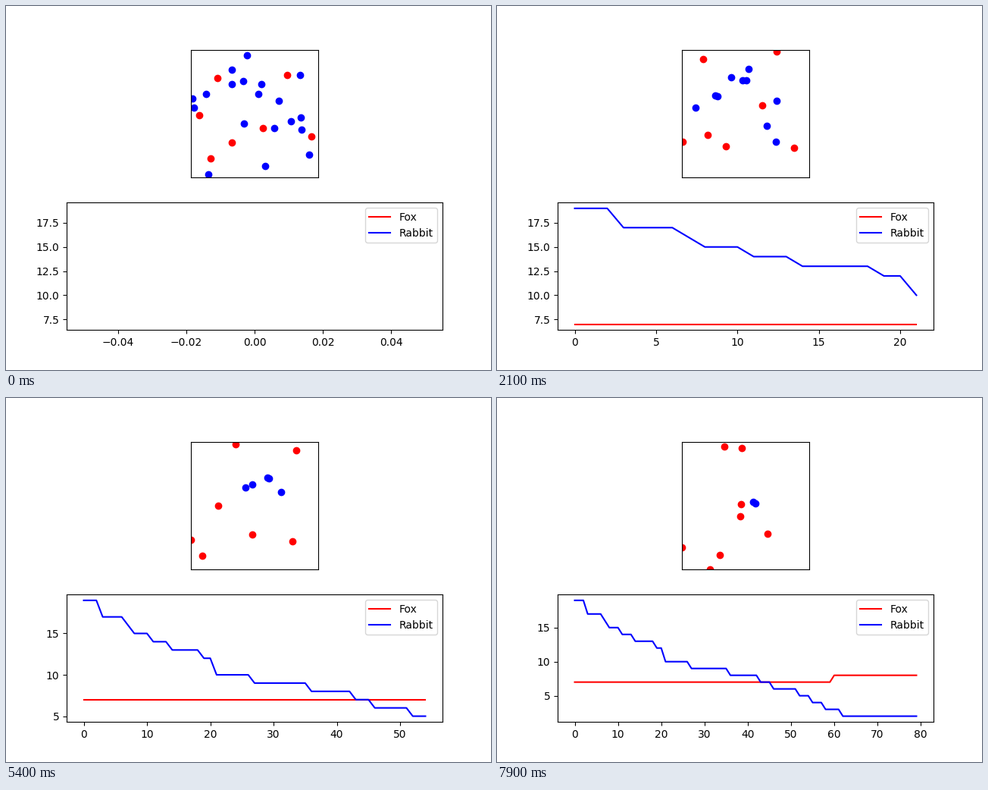
These frames come from a looping animation (640x480 px, 8 s). A matplotlib script:

```python
import numpy as np
import matplotlib.pyplot as plt
from matplotlib.animation import FuncAnimation

STEPS, INTERVAL = 80, 100
LEFT, TOP, SIDE = 244, 57.6, 168        # habitat square, stage pixels
FOX_STEP, RABBIT_STEP = 8, 5            # largest random move per step
HOME, PULL = (342, 130), 0.02           # rabbits slowly gather here

# Where the animals start
FOXES = [(279, 95), (371, 91), (255, 144), (339, 161), (403, 172), (298, 180),
         (270, 201)]
RABBITS = [(318, 65), (298, 84), (298, 103), (313, 99), (337, 103), (333, 116),
           (360, 125), (388, 91), (264, 116), (246, 122), (248, 134), (314, 155),
           (354, 161), (376, 152), (389, 147), (390, 163), (400, 196), (342, 211),
           (267, 222)]

# Steps at which a rabbit is eaten, and at which a fox is born
KILLS = [3, 3, 7, 8, 11, 14, 19, 21, 21, 27, 36, 43, 46, 52, 55, 58, 62]
BIRTH = 60

rng = np.random.default_rng(7)


def wander(animals, step):
    """Move every animal at random, keeping it inside the square."""
    moved = animals + rng.uniform(-step, step, animals.shape)
    return np.clip(moved, (LEFT, TOP), (LEFT + SIDE, TOP + SIDE))


def easiest_prey(foxes, rabbits):
    """Index of the rabbit closest to any fox."""
    gaps = np.linalg.norm(rabbits[:, None] - foxes[None], axis=2)
    return gaps.min(axis=1).argmin()


def simulate():
    foxes, rabbits = np.array(FOXES, float), np.array(RABBITS, float)
    history = [(foxes, rabbits)]
    for n in range(1, STEPS):
        foxes = wander(foxes, FOX_STEP)
        rabbits = wander(rabbits + PULL * (HOME - rabbits), RABBIT_STEP)
        for _ in range(KILLS.count(n)):
            rabbits = np.delete(rabbits, easiest_prey(foxes, rabbits), axis=0)
        if n == BIRTH:
            foxes = np.vstack([foxes, wander(foxes[-1:], FOX_STEP)])
        history.append((foxes, rabbits))
    return history


history = simulate()
steps = np.arange(STEPS)
fox_count, rabbit_count = np.array([(len(f), len(r)) for f, r in history]).T

fig, (field, chart) = plt.subplots(2, 1, figsize=(6.4, 4.8), dpi=100)
field.set(xlim=(LEFT, LEFT + SIDE), ylim=(TOP + SIDE, TOP),
          xticks=[], yticks=[], aspect="equal")
rabbit_dots, = field.plot([], [], "o", color="blue")
fox_dots, = field.plot([], [], "o", color="red")
fox_line, = chart.plot([], [], color="red", label="Fox")
rabbit_line, = chart.plot([], [], color="blue", label="Rabbit")
chart.legend(loc="upper right")


def draw(n):
    foxes, rabbits = history[n]
    fox_dots.set_data(*foxes.T)
    rabbit_dots.set_data(*rabbits.T)

    fox_line.set_data(steps[:n + 1], fox_count[:n + 1])
    rabbit_line.set_data(steps[:n + 1], rabbit_count[:n + 1])
    chart.relim()
    chart.autoscale_view()
    return fox_dots, rabbit_dots, fox_line, rabbit_line


anim = FuncAnimation(fig, draw, frames=STEPS, interval=INTERVAL, repeat=True)
plt.show()
```
